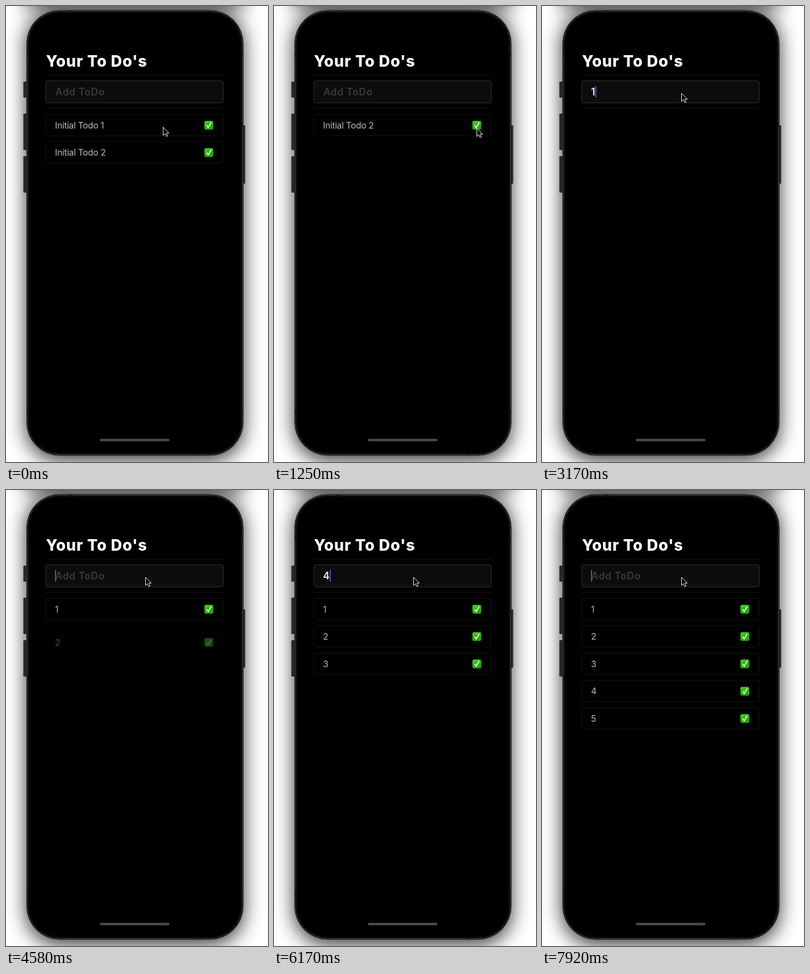
Recreate the animation shown at these times as an HTML page. Size 476 by 826 pixels, loop 8 s.

```html
<!DOCTYPE html>
<html lang="en">
<head>
<meta charset="utf-8">
<title>To-do list</title>
<style>
  html, body { margin: 0; width: 100%; height: 100%; overflow: hidden; background: #fff; }
  svg { display: block; width: 476px; height: 826px; }
  text { font-family: Inter, sans-serif; white-space: pre; }
  .title { font-size: 28px; font-weight: 800; letter-spacing: .9px; fill: #fff; }
  .input { font-size: 18px; font-weight: 600; letter-spacing: .6px; fill: #3a3a3a; }
  .typed { letter-spacing: 0; fill: #ececec; }
  .label { font-size: 16px; letter-spacing: -.3px; fill: #b8b8b8; }
  .rule { stroke: #141414; }
</style>
</head>
<body>
<svg viewBox="0 0 476 826">
  <defs>
    <filter id="blur" x="-100" y="-200" width="676" height="1200" filterUnits="userSpaceOnUse">
      <feGaussianBlur stdDeviation="18"/>
    </filter>
    <linearGradient id="green" x2=".4" y2="1">
      <stop stop-color="#4bcb2b"/>
      <stop offset="1" stop-color="#20a606"/>
    </linearGradient>
    <clipPath id="listArea"><path d="M56 186H411V780H56Z"/></clipPath>
    <g id="check">
      <rect x="360.5" y="11.5" width="16" height="16" rx="3" fill="url(#green)"/>
      <path d="M364.8 20.2l2.6 3.6 5-8.8" fill="none" stroke="#fff" stroke-width="1.7" stroke-linecap="round"/>
    </g>
  </defs>

  <!-- Device -->
  <rect width="476" height="826" fill="#fff"/>
  <rect x="37" y="8" width="394" height="815" rx="60" opacity=".8" filter="url(#blur)"/>
  <rect x="37" y="-120" width="394" height="122" opacity=".8" filter="url(#blur)"/>
  <g fill="#262828">
    <rect x="31.5" y="137" width="8" height="29" rx="1.5"/>
    <rect x="31.5" y="195" width="8" height="66" rx="1.5"/>
    <rect x="31.5" y="272" width="8" height="66" rx="1.5"/>
    <rect x="428" y="216" width="6.5" height="106" rx="1.5"/>
  </g>
  <g fill="none">
    <rect x="37.5" y="8" width="393.5" height="806" rx="60" fill="#000" stroke="#242424"/>
    <rect x="39" y="9.5" width="390.5" height="803" rx="58.5" stroke="#505050"/>
    <rect x="41.5" y="12" width="385.5" height="798" rx="56" stroke="#161616"/>
    <path d="M113.5 9.5h7M348 812.5h7M39 83.5v7M39 731v7M429.5 83.5v7M429.5 731v7"
          stroke="#181818" stroke-width="3"/>
  </g>
  <rect x="170.5" y="784" width="126.5" height="4.5" rx="2.25" fill="#4a4a4a"/>

  <!-- App -->
  <text class="title" x="72.5" y="109.5">Your To Do's</text>
  <path class="rule" d="M72 125.5H395M72 185.5H395"/>
  <rect x="72.5" y="135.5" width="322" height="40" rx="3.5" fill="#0c0c0c" stroke="#323232"/>
  <text class="input" id="placeholder" x="89.5" y="162">Add ToDo</text>
  <text class="input typed" id="typed" x="89" y="162"></text>
  <rect id="caret" y="145" width="2" height="21" fill="#3a57e8"/>
  <g id="list" clip-path="url(#listArea)"></g>
  <path id="cursor" d="M.5 .5V15.3L4 12.2 6.3 17.3 8.8 16.2 6.5 11.2H11Z" fill="#000" stroke="#fff" stroke-linejoin="round"/>
</svg>

<script>
const LOOP = 8000, ENTER = 350, EXIT = 430;
const LIST_TOP = 196.5, ROW = 49.5;
const FOCUS = 2570;

const entries = [
  { text: '1', typed: 3140, added: 3640 },
  { text: '2', typed: 4080, added: 4525 },
  { text: '3', typed: 5060, added: 5590 },
  { text: '4', typed: 6120, added: 6660 },
  { text: '5', typed: 7245, added: 7570 },
];

const items = [
  { text: 'Initial Todo 1', added: -ENTER, removed: 390, slot: () => 0 },
  { text: 'Initial Todo 2', added: -ENTER, removed: 1340, slot: t => t < 390 + EXIT ? 1 : 0 },
  ...entries.map((entry, i) => ({ ...entry, removed: Infinity, slot: () => i })),
];

// Pointer stops: time, x, y
const stops = [
  [0, 285, 219], [80, 285, 219], [370, 368, 228], [850, 368, 228], [960, 368, 221],
  [1360, 368, 221], [1670, 324, 97], [1750, 312, 100], [2170, 253, 157.5], [LOOP, 253, 157.5],
];

const byId = id => document.getElementById(id);
const clamp = v => Math.max(0, Math.min(1, v));
const smooth = p => p * p * (3 - 2 * p);
const easeOut = p => 1 - (1 - p) ** 3;

for (const item of items) {
  item.node = document.createElementNS('http://www.w3.org/2000/svg', 'g');
  item.node.innerHTML = `
    <rect class="rule" x="72.5" width="322" height="38.5" rx="3.5" fill="#000"/>
    <text class="label" x="89" y="25">${item.text}</text>
    <use href="#check"/>`;
  byId('list').append(item.node);
}

function drawItem(item, t) {
  const shown = easeOut(clamp((t - item.added) / ENTER));
  const gone = smooth(clamp((t - item.removed) / EXIT));
  const y = LIST_TOP + item.slot(t) * ROW + 18 * (1 - shown);
  item.node.setAttribute('transform', `translate(${-60 * gone} ${y})`);
  item.node.setAttribute('opacity', shown * (1 - gone));
}

function drawInput(t) {
  const entry = entries.find(e => t >= e.typed && t < e.added);
  const typed = byId('typed');
  typed.textContent = entry ? entry.text : '';
  byId('placeholder').setAttribute('opacity', entry ? 0 : 1);
  byId('caret').setAttribute('x', 89 + (entry ? typed.getComputedTextLength() : 0));
  byId('caret').setAttribute('opacity', t >= FOCUS ? 1 : 0);
}

function drawCursor(t) {
  const next = stops.findIndex(stop => stop[0] > t);
  const [t0, x0, y0] = stops[next - 1], [t1, x1, y1] = stops[next];
  const p = smooth((t - t0) / (t1 - t0));
  byId('cursor').setAttribute('transform', `translate(${x0 + (x1 - x0) * p} ${y0 + (y1 - y0) * p})`);
}

function frame() {
  const t = performance.now() % LOOP;
  items.forEach(item => drawItem(item, t));
  drawInput(t);
  drawCursor(t);
  requestAnimationFrame(frame);
}
frame();
</script>
</body>
</html>
```
